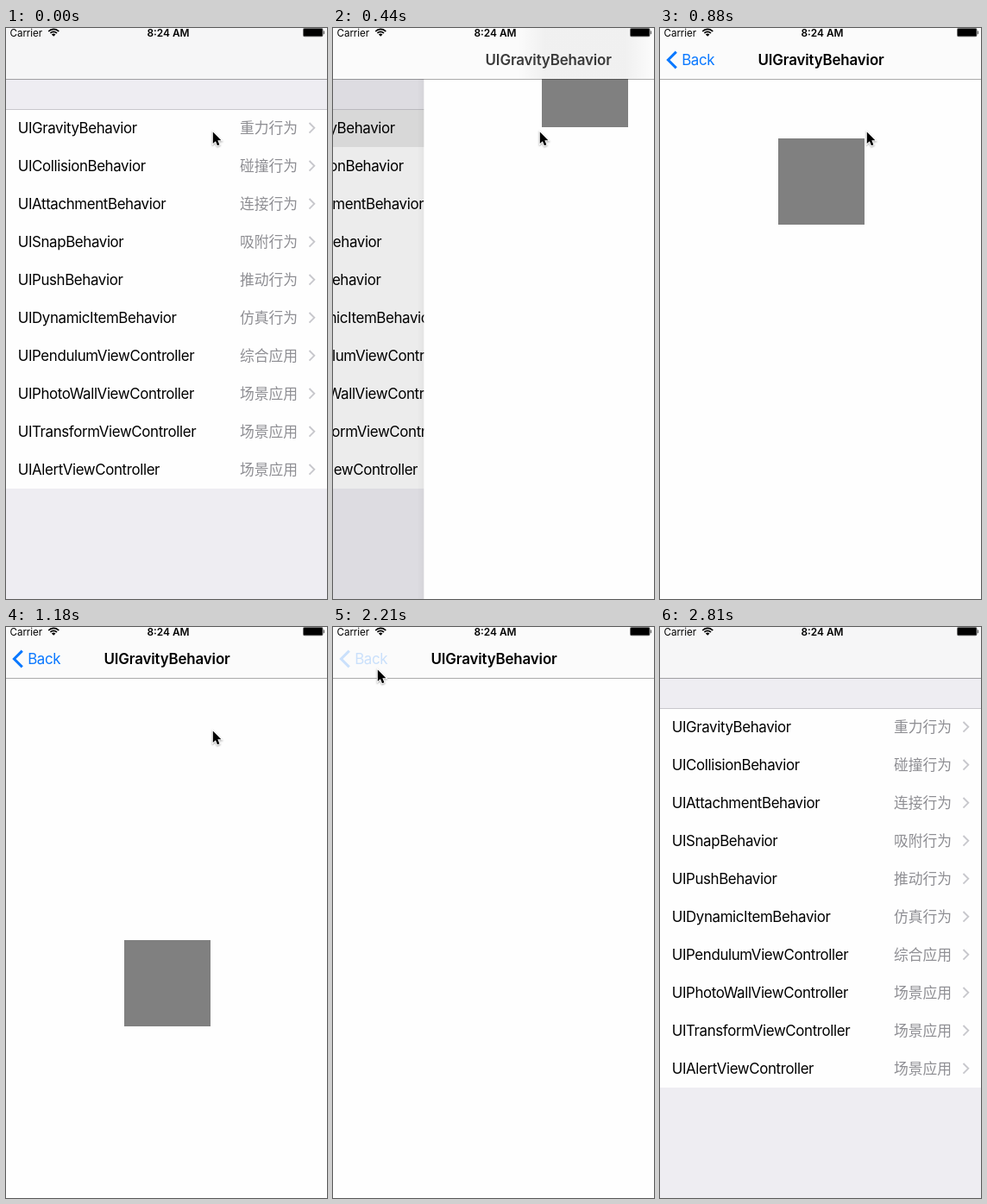
An HTML page with a canvas for the animation above (3360 ms loop, 372x662 px).

```html
<!DOCTYPE html>
<html lang="en">
<head>
<meta charset="utf-8">
<title>Dynamics list</title>
<style>
html, body { margin: 0; width: 100%; height: 100%; overflow: hidden; background: #fefefe; }
canvas { display: block; width: 372px; height: 662px; }
</style>
</head>
<body>
<canvas id="stage" width="372" height="662"></canvas>
<script>
const W = 372, H = 662, LOOP = 3360, NAV = 59;
const ctx = document.getElementById('stage').getContext('2d');
const FACE = 'Inter, Roboto, sans-serif';
const HAN = '"Noto Sans CJK SC", "Noto Sans CJK", "Noto Sans CJK JP", sans-serif';

const ROWS = [
  ['UIGravityBehavior', '重力行为'],
  ['UICollisionBehavior', '碰撞行为'],
  ['UIAttachmentBehavior', '连接行为'],
  ['UISnapBehavior', '吸附行为'],
  ['UIPushBehavior', '推动行为'],
  ['UIDynamicItemBehavior', '仿真行为'],
  ['UIPendulumViewController', '综合应用'],
  ['UIPhotoWallViewController', '场景应用'],
  ['UITransformViewController', '场景应用'],
  ['UIAlertViewController', '场景应用']
];

// The screen is refreshed only at these times.
const TICKS = [0, 300, 440, 590, 730, 880, 1030, 1180, 1330, 1480, 1620,
  1770, 1920, 2060, 2210, 2360, 2510, 2660, 2810];
const PUSH = 300, POP = 2311;

// [time, top] of the falling box
const FALL = [[440, 15], [590, 27], [730, 76], [880, 128], [1030, 249],
  [1180, 363], [1330, 499], [1480, 656], [1620, 820]];
// [time, x, y] of the pointer tip
const POINTER = [[0, 239.8, 120.4], [1480, 235, 122], [1620, 185.8, 118.4],
  [1770, 94.3, 74.4], [1920, 67.3, 59], [2060, 51.8, 49.4]];

const latest = (list, t) => list.filter(k => k[0] <= t).pop();

// Critically damped spring: 1 at rest start, 0 when settled
function spring(ms) {
  const x = Math.max(0, ms) * 0.018;
  return (1 + x) * Math.exp(-x);
}

function rect(color, x, y, w, h) {
  ctx.fillStyle = color;
  ctx.fillRect(x, y, w, h);
}

function text(str, x, y, color, font, spacing = 0, align = 'left') {
  ctx.font = font;
  ctx.letterSpacing = spacing + 'px';
  ctx.textAlign = align;
  ctx.fillStyle = color;
  ctx.fillText(str, x, y);
}

function line(points, color, width) {
  ctx.beginPath();
  points.forEach(([x, y]) => ctx.lineTo(x, y));
  ctx.strokeStyle = color;
  ctx.lineWidth = width;
  ctx.stroke();
}

function drawList(dx, glow, dim) {
  rect('#eeedf2', 0, 0, W, H);
  rect('#c8c7cc', 0, 94, W, 1);
  rect('#fefefe', 0, 95, W, 439);
  if (glow > 0) rect(`rgba(217,217,217,${glow})`, 0, 95, W, 43);
  ctx.save();
  ctx.translate(dx, 0);
  ROWS.forEach(([name, kind], i) => {
    const y = 94 + i * 44;
    text(name, 13.7, y + 28, '#000', `16.9px ${FACE}`, -0.38);
    text(kind, 271, y + 28, '#8e8e93', `16.8px ${HAN}`);
    line([[351.5, y + 16], [357.3, y + 21.8], [351.5, y + 27.6]], '#c7c7cc', 1.9);
  });
  ctx.restore();
  if (dim > 0) rect(`rgba(0,0,0,${0.1 * dim})`, 0, 0, W, H);
}

function drawDetail(x, boxY, shade) {
  const g = ctx.createLinearGradient(x - 8, 0, x, 0);
  g.addColorStop(0, 'rgba(0,0,0,0)');
  g.addColorStop(1, `rgba(0,0,0,${shade})`);
  rect(g, x - 8, 0, 8, H);
  rect('#fefefe', x, 0, W - x, H);
  if (boxY < H) rect('#808080', Math.round(x + 137), boxY, 100, 100);
}

function drawBar(p, boxX, boxY) {
  const mix = (a, b) => Math.round(a + (b - a) * p * p);
  rect(`rgb(${mix(251, 246)},${mix(251, 246)},${mix(251, 247)})`, 0, 0, W, NAV);
  if (boxY < NAV) {
    const g = ctx.createLinearGradient(boxX - 28, 0, boxX + 128, 0);
    g.addColorStop(0, 'rgba(0,0,0,0)');
    g.addColorStop(0.2, 'rgba(0,0,0,0.045)');
    g.addColorStop(0.8, 'rgba(0,0,0,0.045)');
    g.addColorStop(1, 'rgba(0,0,0,0)');
    rect(g, boxX - 28, 0, 156, NAV);
  }
  rect('rgba(0,0,0,0.33)', 0, NAV, W, 1);
}

function drawStatus() {
  text('Carrier', 4.5, 9.7, '#000', `11.6px ${FACE}`, -0.05);
  text('8:24 AM', 188, 9.7, '#000', `600 11.9px ${FACE}`, 0, 'center');
  ctx.lineWidth = 1.7;
  ctx.strokeStyle = '#000';
  for (const r of [8.2, 5.2]) {
    ctx.beginPath();
    ctx.arc(55.2, 9.6, r, -Math.PI * 0.76, -Math.PI * 0.24);
    ctx.stroke();
  }
  ctx.beginPath();
  ctx.moveTo(55.2, 9.8);
  ctx.arc(55.2, 9.8, 3.2, -Math.PI * 0.76, -Math.PI * 0.24);
  ctx.fillStyle = '#000';
  ctx.fill();
  ctx.beginPath();
  ctx.roundRect(344, 0, 23.5, 10.3, 2);
  ctx.roundRect(367.8, 3.3, 1.4, 4, 0.7);
  ctx.fillStyle = 'rgba(0,0,0,0.55)';
  ctx.fill();
  rect('#000', 345, 1, 21.5, 8.3);
}

function drawTitles(t, p) {
  let back = Math.min(1, Math.max(0, (t - 450) / 300));
  if (t >= 2210) back = 0.2 * Math.pow(1 - p, 0.3);
  const arrow = t >= POP ? 0.2 * Math.pow(1 - p, 2) : back;
  const slide = 253 * Math.pow(p, 1.1);

  ctx.globalAlpha = arrow;
  line([[18.8, 27.6], [9.4, 37], [18.8, 46.4]], '#0a78ff', 3);
  ctx.globalAlpha = back;
  text('Back', 25.2 + 122 * p, 43, '#0a78ff', `16.9px ${FACE}`, -0.41);
  ctx.globalAlpha = Math.pow(1 - p, 0.8);
  text(ROWS[0][0], 186.5 + slide, 43, '#000', `600 16.9px ${FACE}`, -0.14, 'center');
  ctx.globalAlpha = 1;
}

function drawPointer(x, y) {
  const shape = [[0, 0], [0, 13.6], [3.1, 10.8], [5.2, 15.8], [7.6, 14.8],
    [5.5, 9.9], [9.6, 9.9]];
  ctx.save();
  ctx.translate(x, y);
  ctx.beginPath();
  shape.forEach(([a, b]) => ctx.lineTo(a, b));
  ctx.closePath();
  ctx.shadowColor = 'rgba(0,0,0,0.35)';
  ctx.shadowBlur = 2;
  ctx.shadowOffsetY = 1;
  ctx.strokeStyle = '#fff';
  ctx.lineWidth = 2;
  ctx.stroke();
  ctx.shadowColor = 'transparent';
  ctx.fillStyle = '#000';
  ctx.fill();
  ctx.restore();
}

function draw(t) {
  // p: 1 shows the list, 0 shows the detail page
  const away = t >= PUSH && t < 2810;
  const popping = t >= POP;
  let p = 1;
  if (away) p = popping ? 1 - spring(t - POP) : t < 880 ? spring(t - PUSH) : 0;
  const x = W * p;
  const fall = latest(FALL, t);
  const boxY = away && fall ? fall[1] : H;

  if (p > 0) {
    const glow = !away ? 0 : popping ? Math.pow(1 - p, 2) : 0.4 + 0.6 * p;
    drawList(-0.3 * (W - x), glow, 1 - p);
  }
  if (away) drawDetail(x, boxY, popping ? 0.13 * (1 - p) : 0.13 * p);
  drawBar(p, x + 137, boxY);
  if (away && p < 0.98) drawTitles(t, p);
  drawStatus();
  if (!popping) {
    const [, px, py] = latest(POINTER, t);
    drawPointer(px, py);
  }
}

const start = performance.now();
function tick(now) {
  const t = Math.max(0, now - start) % LOOP;
  draw(TICKS.filter(k => k <= t).pop());
  requestAnimationFrame(tick);
}
tick(start);
</script>
</body>
</html>
```
